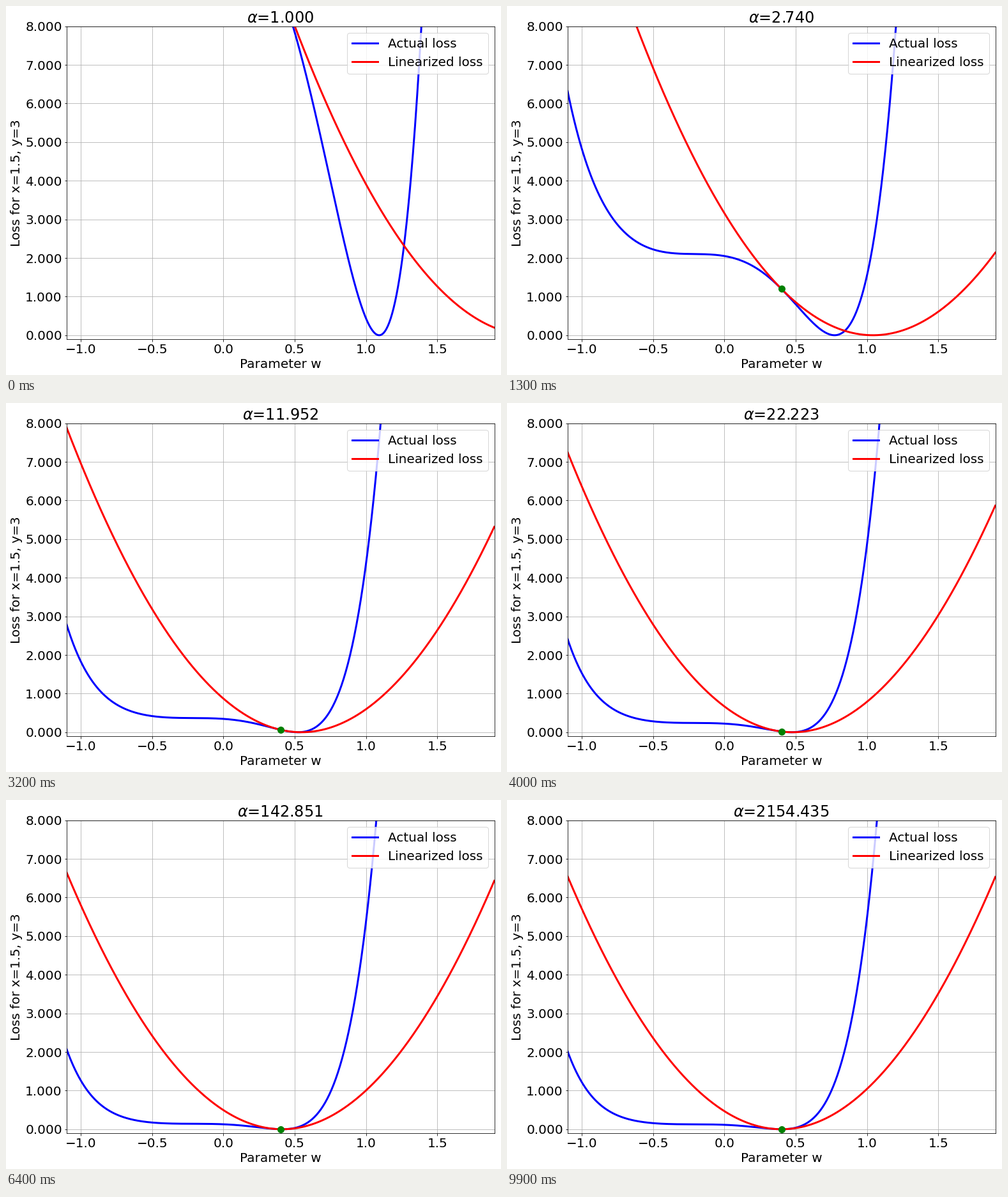
A matplotlib script that plays this animation: 775x577 px, repeating every 10000 ms.

```python
import numpy as np
import matplotlib.pyplot as plt
from matplotlib.animation import FuncAnimation
from matplotlib.ticker import FormatStrFormatter, MultipleLocator

W, H, DPI = 775, 577, 72
FRAMES, INTERVAL = 100, 100
X, Y, W0 = 1.5, 3, 0.4

plt.rcParams.update({"font.family": "DejaVu Sans", "font.size": 20})

alphas = np.logspace(0, 10 / 3, FRAMES)
w = np.linspace(-1.1, 1.9, 600)


def model(w):
    return X * w**3 + 0.956 * w**2 + 0.22 * w


def slope(w):
    return 3 * X * w**2 + 2 * 0.956 * w + 0.22


change = model(w) - model(W0)
linear_change = slope(W0) * (w - W0)


def loss(delta, alpha):
    return (delta - Y / alpha) ** 2


# The tiny offset guards against float truncation of the pixel size
fig = plt.figure(figsize=((W + 1e-6) / DPI, (H + 1e-6) / DPI), dpi=DPI,
                 facecolor="white")
ax = fig.add_axes([94.9 / W, 56.15 / H, 669.6 / W, 489.24 / H])
ax.set_xlim(-1.1, 1.9)
ax.set_ylim(-0.1, 8)
ax.xaxis.set_major_locator(MultipleLocator(0.5))
ax.yaxis.set_major_locator(MultipleLocator(1))
ax.yaxis.set_major_formatter(FormatStrFormatter("%.3f"))
ax.set_xlabel("Parameter w")
ax.set_ylabel(f"Loss for x={X}, y={Y}")
ax.grid(True)

actual, = ax.plot(w, loss(change, 1), "b", lw=3, label="Actual loss")
linearized, = ax.plot(w, loss(linear_change, 1), "r", lw=3,
                      label="Linearized loss")
start, = ax.plot([W0], [loss(0, 1)], "go", ms=10)
title = ax.set_title("")
ax.legend(loc="upper right")


def update(i):
    alpha = alphas[i]
    actual.set_ydata(loss(change, alpha))
    linearized.set_ydata(loss(linear_change, alpha))
    start.set_ydata([loss(0, alpha)])
    title.set_text(rf"$\alpha$={alpha:.3f}")
    return actual, linearized, start, title


anim = FuncAnimation(fig, update, frames=FRAMES, interval=INTERVAL,
                     repeat=True, repeat_delay=0, blit=False)
plt.show()
```
